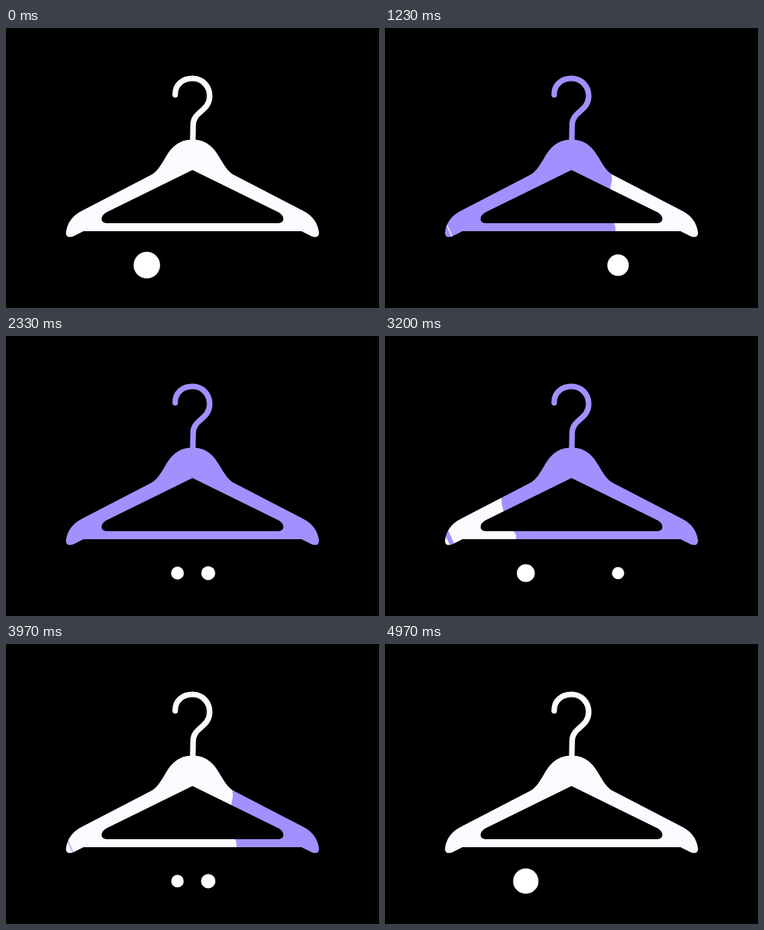
Recreate the animation shown at these times as an HTML page with a canvas. Size 467x350 px, loop 5 s.

```html
<!DOCTYPE html>
<html lang="en">
<head>
<meta charset="utf-8">
<title>Hanger loader</title>
<style>
  html, body { margin: 0; width: 100%; height: 100%; overflow: hidden; background: #000; }
  canvas { display: block; }
</style>
</head>
<body>
<canvas id="stage" width="467" height="350"></canvas>
<script>
const ctx = document.getElementById('stage').getContext('2d');
const LOOP = 5000;
const SECOND_WIPE = 2740;
const WHITE = '#fafaff';
const PURPLE = '#a390ff';

const hook = new Path2D(
  'M211.8 83.5 C211.5 71 221 63 233.5 63 C246 63 255 73 255 85 ' +
  'C255 104 234.5 104 234.3 121 L233.8 144');
const body = new Path2D(
  'M233.5 139.5 C214 139.5 205.5 152 199.5 162 C193.5 172 189.5 180 180 184.5 L95 228.5 ' +
  'C82.5 235 77 243.5 75.2 255 C74.5 261 79 262.5 84 260.5 L97 254 ' +
  'L370 254 L383 260.5 C388 262.5 392.5 261 391.8 255 ' +
  'C390 243.5 384.5 235 372 228.5 L287 184.5 C277.5 180 273.5 172 267.5 162 ' +
  'C261.5 152 253 139.5 233.5 139.5 Z ' +
  'M233.5 177.5 L342 230.8 C349.5 235.5 349 244 341 244 L126 244 ' +
  'C118 244 117.5 235.5 125 230.8 Z');

// Pairs of [ms, x] for the upper edge of the wipe, and [ms, width] for the tip
const frontKeys = [[60, 75], [460, 147], [630, 178], [1230, 284], [1620, 370], [1730, 396]];
const tipKeys = [[0, 6], [630, 5.5], [1230, 1.2], [1400, 0]];

// Each dot: centre, start of growth, peak, end, exponent of the fall
const PERIOD = 1635;
const HOLD = 87;
const dots = [
  { x: 176.3, from: -480, peak: 0, to: 400, pow: 1 },
  { x: 214.7, from: 0, peak: 400, to: 805, pow: 1 },
  { x: 253.2, from: 430, peak: 770, to: 1140, pow: 1 },
  { x: 291.8, from: 820, peak: 1220, to: 1612, pow: 1.5 }
];

function track(keys, t) {
  if (t <= keys[0][0]) return keys[0][1];
  for (let i = 1; i < keys.length; i++) {
    const [t0, v0] = keys[i - 1], [t1, v1] = keys[i];
    if (t < t1) return v0 + (v1 - v0) * (t - t0) / (t1 - t0);
  }
  return keys[keys.length - 1][1];
}

function drawHanger(color) {
  ctx.fillStyle = ctx.strokeStyle = color;
  ctx.fill(body, 'evenodd');
  ctx.lineWidth = 7;
  ctx.lineCap = 'round';
  ctx.stroke(hook);
}

function drawWipe(t, before, after) {
  if (t < frontKeys[0][0]) return;
  const upper = track(frontKeys, t);
  const bulge = Math.min(28, 4 + 13 * Math.exp((460 - t) / 200));
  const lower = upper + bulge;
  ctx.globalCompositeOperation = 'source-atop';
  ctx.fillStyle = after;
  ctx.beginPath();
  ctx.moveTo(0, 0);
  ctx.lineTo(upper - 15, 50);
  ctx.lineTo(upper, 190);
  ctx.quadraticCurveTo(upper - 7, 215, lower, 249);
  ctx.lineTo(lower, 350);
  ctx.lineTo(0, 350);
  ctx.fill();

  const width = track(tipKeys, t);
  if (width > 0) {
    ctx.strokeStyle = before;
    ctx.lineWidth = width;
    ctx.beginPath();
    ctx.moveTo(76, 243);
    ctx.lineTo(85, 263);
    ctx.stroke();
  }
  ctx.globalCompositeOperation = 'source-over';
}

function pulse(dot, t) {
  if (t <= dot.from || t >= dot.to) return 0;
  if (t < dot.peak) return (t - dot.from) / (dot.peak - dot.from);
  return 1 - Math.pow((t - dot.peak) / (dot.to - dot.peak), dot.pow);
}

function drawDots(t) {
  const run = Math.min(Math.max(t - HOLD, 0), 3 * PERIOD);
  const phase = run % PERIOD;
  ctx.fillStyle = '#fff';
  for (const dot of dots) {
    const r = 16.6 * Math.max(pulse(dot, phase), pulse(dot, phase - PERIOD));
    ctx.beginPath();
    ctx.arc(dot.x, 296.4, r, 0, 2 * Math.PI);
    ctx.fill();
  }
}

function draw(t) {
  const back = t >= SECOND_WIPE;
  const [before, after] = back ? [PURPLE, WHITE] : [WHITE, PURPLE];
  ctx.clearRect(0, 0, 467, 350);
  drawHanger(before);
  drawWipe(back ? t - SECOND_WIPE : t, before, after);
  drawDots(t);
}

const start = performance.now();
function tick() {
  draw((performance.now() - start) % LOOP);
  requestAnimationFrame(tick);
}
tick();
</script>
</body>
</html>
```
